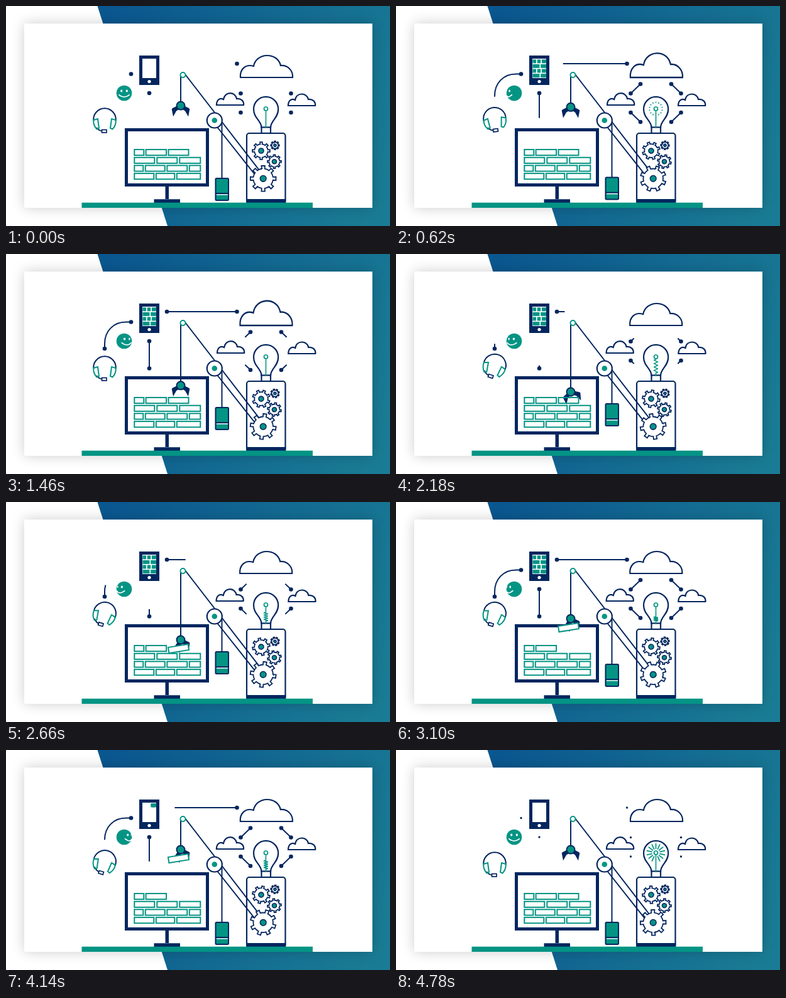
An HTML page that plays this animation: 611 px wide and 351 px high, repeating every 4820 ms.

```html
<!DOCTYPE html>
<html lang="en">
<head>
<meta charset="utf-8">
<title>Workshop</title>
<style>
  html, body { margin: 0; width: 100%; height: 100%; overflow: hidden; background: #fff; }
  .stage { position: relative; width: 611px; height: 351px; overflow: hidden; background: #fff; }
  .slant {
    position: absolute; inset: 0;
    background: linear-gradient(110deg, #0a568f 22%, #1a7c94 96%);
    clip-path: polygon(145.5px 0, 100% 0, 100% 100%, 257px 100%);
  }
  .card {
    position: absolute; left: 29px; top: 28px; width: 554px; height: 294px;
    background: #fff; box-shadow: 0 0 20px rgba(0, 0, 0, .2);
  }
  svg { position: absolute; left: 0; top: 0; }
  .navy { fill: #04265f; }
  .teal { fill: #049484; }
  .white { fill: #fff; }
  .line { fill: none; stroke: #04265f; stroke-width: 2; }
  .body { fill: #fff; stroke: #04265f; stroke-width: 2.2; }
  .green { fill: none; stroke: #049484; stroke-width: 2; }
  .hub { fill: #049484; stroke: #04265f; stroke-width: 1.6; }
</style>
</head>
<body>
<div class="stage">
  <div class="slant"></div>
  <div class="card"></div>
  <svg width="611" height="351" viewBox="0 0 611 351">
    <defs>
      <clipPath id="screen"><rect x="217" y="84" width="22" height="31"/></clipPath>
      <path id="arm" d="M-5 0 L-13 4 L-14.3 5.5 L-12 17.5 L-7 8.5 L-3 6Z"/>
    </defs>

    <g id="links"></g>

    <g id="bigCloud"><path class="body" d="M373 114 C372 101 381 92 394 96 C398 74 432 73 437 95 C449 94 457 104 456 114Z"/></g>
    <path id="cloudA" class="body" d="M335 158 C335 150 340 146 346 149 C348 136 365 136 367 148 C374 147 379 152 378 158Z"/>
    <path id="cloudB" class="body" d="M449 159 C449 151 454 147 460 150 C462 137 479 138 481 149 C488 148 493 153 492 159Z"/>

    <rect class="navy" x="212" y="79" width="32" height="47"/>
    <rect class="white" x="217" y="84" width="22" height="31"/>
    <circle class="white" cx="228" cy="120.5" r="2.6"/>
    <g id="tiles" class="teal" clip-path="url(#screen)"></g>

    <circle class="teal" cx="188" cy="139" r="12.3"/>
    <ellipse id="eyeL" class="white"/>
    <ellipse id="eyeR" class="white"/>
    <path id="mouth" fill="none" stroke="#fff" stroke-width="1.7" stroke-linecap="round"/>

    <g id="headset">
      <path class="line" d="M139.3 183 A17.8 17.8 0 1 1 174.7 183 M144 194 Q148 199 153 199.5"/>
      <g class="green">
        <path d="M139.3 182 L146 180 L148 195 L144.5 196.5 Q138.5 190 139.3 182Z"/>
        <path d="M174.7 182 L168 180 L166 195 L169.5 196.5 Q175.5 190 174.7 182Z"/>
      </g>
      <rect class="body" x="152.5" y="197.5" width="7.5" height="4.5" style="stroke-width:1.7"/>
    </g>

    <rect class="navy" x="189" y="195" width="134" height="93"/>
    <rect class="white" x="194" y="200" width="124" height="83"/>
    <rect class="navy" x="253.5" y="288" width="5.5" height="20"/>
    <rect class="navy" x="235.5" y="308.3" width="41.5" height="5.7"/>
    <g id="wall" class="green"></g>

    <rect class="body" x="383" y="203" width="61.5" height="110.5" rx="4"/>
    <rect class="navy" x="382" y="308" width="63.5" height="6" rx="1"/>
    <path class="body" d="M406.5 194 C406.5 183 394 179 394 164.5 A19.6 19.6 0 0 1 433.2 164.5 C433.2 179 421 183 421 194Z"/>
    <rect class="body" x="406.5" y="193.5" width="14.5" height="9.5"/>
    <path id="stem" class="green" stroke-linejoin="round" style="stroke-width:1.6"/>
    <circle class="green" cx="413.5" cy="164" r="3" style="fill:#fff;stroke-width:1.7"/>
    <path id="rays" class="green" style="stroke-width:1.7"/>

    <path class="line" d="M285 109 L403 262 M332 188 L400 274"/>
    <g id="gears"></g>
    <circle class="body" cx="331.8" cy="182.5" r="12"/>
    <circle class="teal" cx="331.8" cy="182.5" r="4.3"/>
    <path id="weightRope" class="line"/>
    <g id="weight">
      <rect class="hub" x="333.5" y="1" width="20.5" height="35" rx="1.5" style="stroke-width:2"/>
      <path class="line" d="M333 25H354"/>
      <path d="M335 27H353" stroke="#fff" stroke-width="1.4"/>
    </g>

    <path id="rope" class="line"/>
    <circle cx="281.5" cy="110" r="4" class="green" style="fill:#fff"/>
    <g id="claw">
      <use id="armL" href="#arm" class="navy"/>
      <use id="armR" href="#arm" class="navy"/>
      <circle class="hub" r="6.5" style="stroke-width:2"/>
    </g>
    <rect id="brick" class="green" x="-16" y="-4.6" width="32" height="9.2"/>

    <rect class="teal" x="120.5" y="313.7" width="367.5" height="8.3"/>
  </svg>
</div>

<script>
const STEP = 40, FIRST = 100, FRAMES = 119;
const LOOP = FIRST + (FRAMES - 1) * STEP;
const SPAN = FRAMES * STEP / 1000;

const $ = id => document.getElementById(id);
const set = (el, attrs) => { for (const k in attrs) el.setAttribute(k, attrs[k]); return el; };
const add = (parent, tag, attrs) =>
  set(parent.appendChild(document.createElementNS('http://www.w3.org/2000/svg', tag)), attrs);

const ramp = (t, a, b) => Math.min(1, Math.max(0, (t - a) / (b - a)));
const ease = u => u * u * (3 - 2 * u);
const move = (t, a, b) => ease(ramp(t, a, b));
const rad = deg => deg * Math.PI / 180;

// Value at t on a line through [time, value] points.
function along(t, keys) {
  for (let i = 1; i < keys.length; i++) {
    const [a, u] = keys[i - 1], [b, v] = keys[i];
    if (t <= b) return u + (v - u) * ramp(t, a, b);
  }
  return keys[keys.length - 1][1];
}

// Links: drawn from one end, then wiped toward the other, swapping ends each turn.
const slow = { turn: SPAN / 2, draw: [.08, .606], pop: [.58, .66], drop: [1.58, 1.68], wipe: [1.64, 2.18], fade: [2.26, 2.42] };
const fast = { turn: SPAN / 4, draw: [.06, .33], pop: [.3, .36], drop: [.68, .76], wipe: [.75, 1.02], fade: [1.09, 1.21] };

function link(x1, y1, x2, y2, pace, d = `M${x1} ${y1}L${x2} ${y2}`) {
  const g = $('links');
  const line = add(g, 'path', { d, class: 'line', pathLength: 100 });
  const dots = [[x1, y1], [x2, y2]].map(([cx, cy]) => add(g, 'circle', { cx, cy, class: 'navy' }));
  return { line, dots, pace };
}
const links = [
  link(199, 108.5, 157, 151, slow, 'M199 108.5H191C170 108.5 157 124 157 143V151'),
  link(228, 139, 228, 182.5, slow),
  link(367.5, 92, 256, 92, slow),
  link(373.5, 139.5, 389, 124.5, fast),
  link(453.5, 139.5, 438, 124.5, fast),
  link(373.5, 170, 389, 185, fast),
  link(453.5, 170, 438, 185, fast)
];

function poseLink({ line, dots, pace }, t) {
  const back = Math.floor(t / pace.turn) % 2, p = t % pace.turn;
  let from = 100 * ramp(p, ...pace.wipe), to = 100 * ramp(p, ...pace.draw);
  if (back) [from, to] = [100 - to, 100 - from];
  set(line, { 'stroke-dasharray': `0 ${from} ${to - from} 300` });
  const first = 1 - ramp(p, ...pace.drop);
  const last = ramp(p, ...pace.pop) * (1 - ramp(p, ...pace.fade));
  set(dots[back], { r: 3.3 * first });
  set(dots[1 - back], { r: 3.3 * last });
}

// Bricks on the monitor and tiles on the phone.
const rows = [
  [[204, 15], [222.3, 32.5]],
  [[204, 32], [240, 32], [276, 33]],
  [[204, 14], [221.5, 31], [256, 32], [291.5, 17.5]],
  [[204, 31], [238.5, 29.5], [271.5, 37.5]]
];
rows.forEach((row, i) => row.forEach(([x, width]) =>
  add($('wall'), 'rect', { x: x + .3, y: 229 + i * 12.7, width, height: 9.2 })));

const tiles = [];
for (let i = 0; i < 4; i++) {
  const widths = i % 2 ? [11, 9] : [5.5, 5.5, 7];
  widths.reduce((x, width, j) => {
    const el = add($('tiles'), 'rect', { x, y: 85.3 + i * 7.6, width, height: 6 });
    tiles.push({ el, order: (3 - i) * 3 + j });
    return x + width + 1.7;
  }, 217.5);
}
function poseTile({ el, order }, t) {
  const start = order * .03, end = 3.3 + order * .07;
  const shift = 23 * (1 - move(t, start - .01, start + .2) + move(t, end, end + .25));
  set(el, { transform: `translate(${shift} 0)` });
}

// Gears: a round body with narrow teeth.
function gear(x, y, r, teeth, hub, turn) {
  const root = r * .77;
  let d = '';
  for (let i = 0; i < teeth; i++)
    [[-.2, root], [-.17, r], [.17, r], [.2, root]].forEach(([o, k], j) => {
      const a = (i + o) / teeth * 2 * Math.PI - Math.PI / 2;
      const step = !d ? 'M' : j ? 'L' : `A${root} ${root} 0 0 1 `;
      d += `${step}${(k * Math.cos(a)).toFixed(2)} ${(k * Math.sin(a)).toFixed(2)}`;
    });
  const last = -.2 / teeth * 2 * Math.PI - Math.PI / 2;
  d += `A${root} ${root} 0 0 1 ${root * Math.cos(last)} ${root * Math.sin(last)}Z`;
  const el = add($('gears'), 'g', {});
  add(el, 'path', { d, class: 'body', style: 'stroke-width:1.8' });
  add(el, 'circle', { r: hub, class: 'hub' });
  return { el, x, y, turn };
}
const gears = [
  gear(428, 222.3, 6.8, 8, 2, -360),
  gear(406, 231, 14, 8, 4, 225),
  gear(427, 248.2, 11, 8, 3.5, -270),
  gear(409.2, 275.3, 20.5, 8, 4.8, 180)
];

// Smiley: features wrapped around a turning ball.
const onBall = (lon, lat) => ({
  x: 188 + 12 * Math.cos(rad(lat)) * Math.sin(rad(lon)),
  y: 139 - 12 * Math.sin(rad(lat)),
  face: Math.cos(rad(lon))
});
function poseSmiley(t) {
  const spin = along(t, [[0, 0], [.56, -62], [1.4, -335], [2.12, -385], [3.04, -415], [4.08, -668], [4.66, -720]]);
  [['eyeL', -22], ['eyeR', 22]].forEach(([id, lon]) => {
    const { x, y, face } = onBall(lon + spin, 17);
    set($(id), { cx: x, cy: y, rx: Math.max(0, 1.7 * face), ry: 1.9 });
  });
  let d = '';
  for (let lon = -44; lon <= 44; lon += 8) {
    const { x, y, face } = onBall(lon + spin, 16 - 46 * Math.cos(rad(lon * 1.15)));
    if (face > 0) d += `${d ? 'L' : 'M'}${x.toFixed(2)} ${y.toFixed(2)}`;
  }
  set($('mouth'), { d });
}

function poseBulb(t) {
  const zig = along(t, [[1.5, 0], [2.12, 22], [3.04, 7], [4.08, 14], [4.4, 0]]);
  let d = `M413.5 167V${190 - zig}`;
  for (let i = 0; i < 8 && zig > 0; i++)
    d += `L${413.5 + (i % 2 ? 3 : -3)} ${190 - zig + (i + .5) * zig / 8}`;
  set($('stem'), { d: d + 'L413.5 190V194' });

  const early = t < 1;
  const inner = early ? 6 + 3.4 * ramp(t, .3, .56) : 6;
  const outer = early
    ? 6 + 8 * ramp(t, .1, .35) - 2.8 * ramp(t, .35, .56)
    : 6 + 9 * ramp(t, 4.4, 4.68);
  const lit = early ? t > .1 && t < .62 : t > 4.4;
  let rays = '';
  for (let i = 1; lit && i < 14; i++) {
    const a = Math.PI / 2 + i * Math.PI / 7, c = Math.cos(a), s = Math.sin(a);
    rays += `M${413.5 + inner * c} ${164 + inner * s}L${413.5 + outer * c} ${164 + outer * s}`;
  }
  set($('rays'), { d: rays });
}

function poseCrane(t) {
  const y = 159 + 61 * (move(t, .4, 1.75) - move(t, 2.67, 3.36));
  const lean = -16 * (move(t, 1.8, 2.12) - move(t, 4.16, 4.35));
  const grip = -14 * (move(t, 2.12, 2.5) - move(t, 4.16, 4.35));
  const fall = ramp(t, 4.2, 4.48) ** 2;
  const tilt = -9 * move(t, 2.2, 2.6) * (1 - fall);
  const held = t > 2.2 && t < 4.48;
  const top = 274 - (y - 159) * .59;

  set($('rope'), { d: `M278 111V${y - 6}` });
  set($('claw'), { transform: `translate(278 ${y}) rotate(${lean})` });
  set($('armL'), { transform: `rotate(${grip})` });
  set($('armR'), { transform: `scale(-1 1) rotate(${grip})` });
  const brickY = held ? y + 14 + (220 - y) * fall : 233.6;
  set($('brick'), { transform: `translate(274.5 ${brickY}) rotate(${tilt})` });
  $('brick').style.fill = held ? '#fff' : 'none';
  set($('weight'), { transform: `translate(0 ${top})` });
  set($('weightRope'), { d: `M343.5 188V${top + 1}` });
}

function poseClouds(t) {
  const swell = Math.sin(Math.PI * ramp(t, 0, 2.12));
  const drift = -.4 * (1 - Math.cos(2 * Math.PI * t / SPAN));
  set($('bigCloud'), { transform: `translate(${drift} 114) scale(1 ${1 + .14 * swell}) translate(0 -114)` });
  set($('cloudA'), { transform: `translate(${drift / 2 + 1.5 * swell} 0)` });
  set($('cloudB'), { transform: `translate(${-drift / 2} 0)` });
}

function poseHeadset(t) {
  const lean = along(t, [[0, 0], [.56, -7], [1.4, 0], [2.12, 18], [3.04, 17], [4.08, 16], [4.7, 0]]);
  const lift = -Math.abs(lean) * .2;
  set($('headset'), { transform: `translate(0 ${lift}) rotate(${lean} 157 181.5)` });
}

function pose(t) {
  links.forEach(l => poseLink(l, t));
  tiles.forEach(k => poseTile(k, t));
  gears.forEach(({ el, x, y, turn }) =>
    set(el, { transform: `translate(${x} ${y}) rotate(${turn * t / SPAN})` }));
  poseSmiley(t);
  poseBulb(t);
  poseCrane(t);
  poseClouds(t);
  poseHeadset(t);
}

const start = performance.now();
function tick() {
  const ms = (performance.now() - start) % LOOP;
  const n = ms < FIRST ? 0 : 1 + Math.floor((ms - FIRST) / STEP);
  pose(n * STEP / 1000);
  requestAnimationFrame(tick);
}
tick();
</script>
</body>
</html>
```
